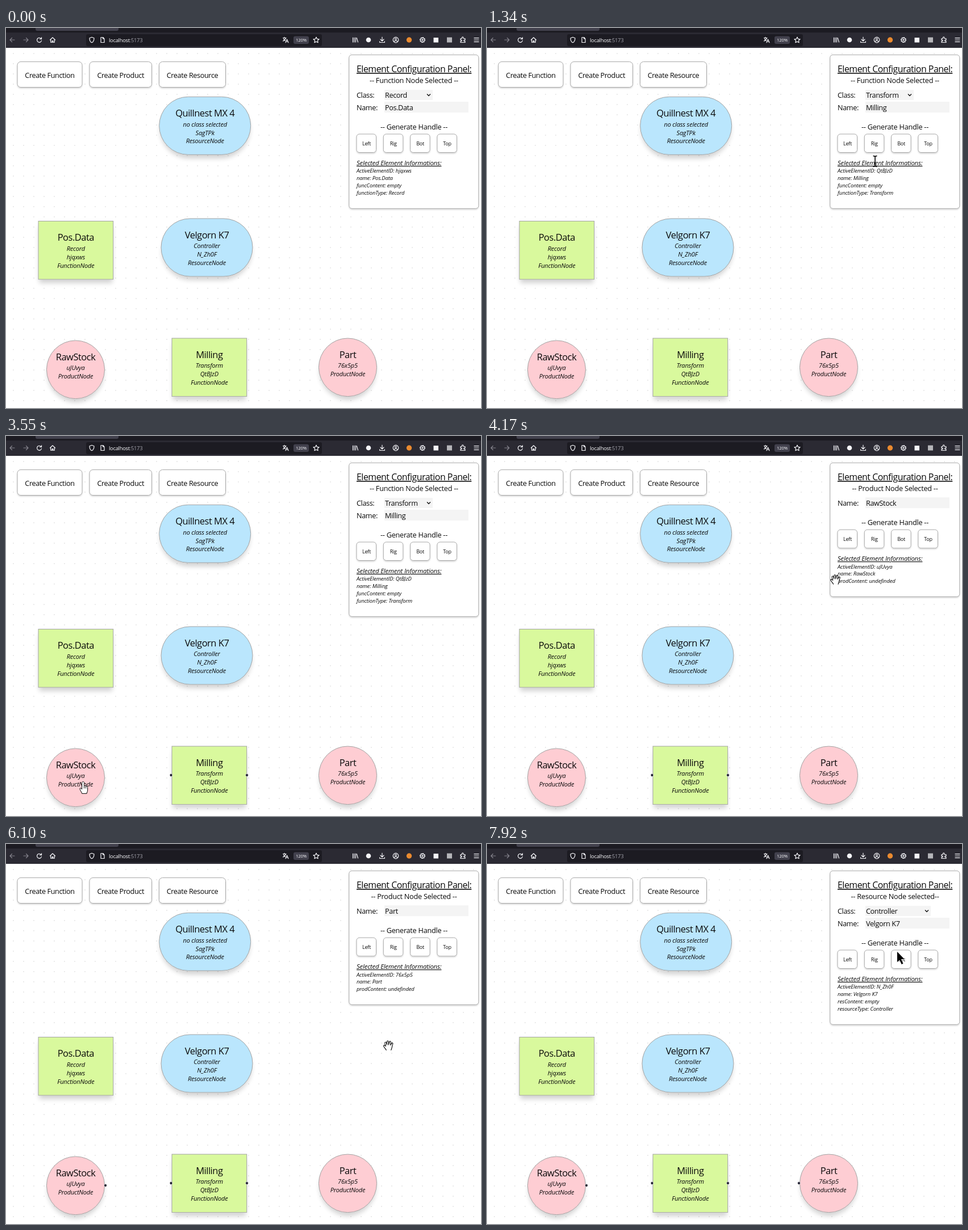
Write an HTML page that moves like this. It is 836 px wide and 670 px high and loops after 7.99 s.

```html
<!DOCTYPE html>
<html lang="en">
<head>
<meta charset="utf-8">
<title>Node editor</title>
<style>
  html, body { margin: 0; width: 100%; height: 100%; overflow: hidden; background: #fff; }
  svg { display: block; width: 100vw; height: 100vh; }
  text { font-family: "Open Sans", "Noto Sans", sans-serif; font-size: 12.65px; letter-spacing: -.03em; fill: #0a0a0a; }
  .mid { text-anchor: middle; }
  .title { font-size: 16.5px; }
  .sub { font-size: 11px; font-style: italic; letter-spacing: -.015em; }
  .head { font-size: 15.9px; text-decoration: underline; }
  .note { letter-spacing: -.018em; }
  .infoHead { font-size: 11.3px; font-style: italic; letter-spacing: -.012em; text-decoration: underline; }
  .info { font-size: 9.4px; font-style: italic; letter-spacing: -.01em; }
  .small { font-size: 9px; }
  .box { fill: #fff; stroke: #a9a9a9; }
  .node { stroke: #a3a3a3; }
  .field { fill: #f4f4f4; }
  .icon { fill: none; stroke: #f4f4f8; stroke-width: 1.2; stroke-linecap: round; stroke-linejoin: round; }
  .cursor path { stroke: #000; stroke-width: 1; fill: #fff; stroke-linejoin: round; }
</style>
</head>
<body>
<svg viewBox="0 0 836 670" xmlns="http://www.w3.org/2000/svg">
  <defs>
    <pattern id="grid" x="4" y="36" width="18" height="18" patternUnits="userSpaceOnUse">
      <circle cx="9" cy="9" r=".65" fill="#c4c4c4"/>
    </pattern>
    <filter id="nodeShadow" x="-20%" y="-20%" width="140%" height="150%">
      <feMorphology in="SourceAlpha" operator="erode" radius="2"/>
      <feGaussianBlur stdDeviation="4.5"/>
      <feOffset dy="7.5"/>
      <feComponentTransfer result="shadow"><feFuncA type="linear" slope=".18"/></feComponentTransfer>
      <feMerge><feMergeNode in="shadow"/><feMergeNode in="SourceGraphic"/></feMerge>
    </filter>
    <filter id="boxShadow" x="-20%" y="-20%" width="140%" height="150%">
      <feDropShadow dx="0" dy="1.6" stdDeviation="1.2" flood-opacity=".17"/>
    </filter>
  </defs>
  <rect width="836" height="670" fill="#fff"/>
  <rect y="35" width="836" height="635" fill="url(#grid)"/>
  <g id="nodes"></g>
  <g id="handles"></g>
  <g id="tools"></g>
  <g id="panel"></g>
  <g id="browser"></g>
  <g id="cursor" class="cursor"></g>
</svg>
<script>
const LOOP = 7990;
const $ = id => document.getElementById(id);

const text = (x, y, str, cls = '') => `<text x="${x}" y="${y}" class="${cls}">${str}</text>`;
const rect = (x, y, w, h, rx, attrs) => `<rect x="${x}" y="${y}" width="${w}" height="${h}" rx="${rx}" ${attrs}/>`;
const box = (x, y, w, h, rx) => rect(x, y, w, h, rx, 'class="box" filter="url(#boxShadow)"');

const SHAPES = {
  Resource: { w: 161, h: 102, rx: 51, fill: '#bae6fd' },
  Function: { w: 131.7, h: 102.6, rx: 0, fill: '#d9f99d' },
  Product: { w: 102, h: 102.6, rx: 51.3, fill: '#fecdd3' }
};

function node(kind, x, y, name, ...lines) {
  const { w, h, rx, fill } = SHAPES[kind];
  const cx = x + w / 2;
  return rect(x, y, w, h, rx, `class="node" fill="${fill}" filter="url(#nodeShadow)"`) +
    text(cx, y + 34.5, name, 'mid title') +
    [...lines, kind + 'Node'].map((s, i) => text(cx, y + 52.4 + i * 14.8, s, 'mid sub')).join('');
}

$('nodes').innerHTML =
  node('Resource', 269.7, 121.3, 'Quillnest MX 4', 'no class selected', 'SagTPk') +
  node('Resource', 273, 336, 'Velgorn K7', 'Controller', 'N_Zh0F') +
  node('Function', 57, 340.5, 'Pos.Data', 'Record', 'hjqxws') +
  node('Function', 292, 547, 'Milling', 'Transform', 'QtBJzD') +
  node('Product', 71.5, 551, 'RawStock', 'uJUvya') +
  node('Product', 550.5, 547, 'Part', '76x5p5');

$('tools').innerHTML = [['Function', 20, 114], ['Product', 147, 109.5], ['Resource', 269.5, 117]]
  .map(([s, x, w]) => box(x, 59.5, w, 45, 6) + text(x + w / 2, 88, 'Create ' + s, 'mid')).join('');

// Browser bar
const icon = (x, d, attrs = '') => `<path class="icon" transform="translate(${x} 21)" d="${d}" ${attrs}/>`;
const dim = 'style="stroke:#85848d"';
$('browser').innerHTML =
  rect(0, 0, 836, 9, 0, 'fill="#1c1b22"') +
  rect(0, 8, 836, 27, 0, 'fill="#2b2a33"') +
  rect(52, -5, 146, 10, 3, 'fill="#42414d"') +
  rect(141, 11, 415, 21, 3, 'fill="#1c1b22"') +
  rect(506, 14.5, 27, 13.5, 3, 'fill="#42414d"') +
  icon(11, 'M4 0H-4L-.5-3.5M-4 0-.5 3.5', dim) +
  icon(35, 'M-4 0H4L.5-3.5M4 0 .5 3.5', dim) +
  icon(58.5, 'M3.5-1.8A4 4 0 1 0 4 1M4-4.5V-1.5H1') +
  icon(82, 'M-4.5 0 0-4.2 4.5 0M-3.3-1V4.2H3.3V-1M-.8 4V1.5H.8V4') +
  icon(151, 'M0-4.8 4-3.3C4 1 3 3.5 0 4.8C-3 3.5-4 1-4-3.3Z') +
  icon(170, 'M-3-4.5H.8L3-2.2V4.5H-3ZM.5-4.5V-2H3') +
  `<text x="181" y="24.8" style="font-size:9.4px;fill:#fbfbfe">localhost<tspan fill="#a5a4ad">:5173</tspan></text>` +
  icon(492, 'M-4.5-3.5H1M-2-4.8V-3.5M.5-3.5C-.5-.5-2 1-4.5 2M-3.5-2C-2.5 0-1.5 1-.5 1.5M0 4.8 2.5-1 5 4.8M1 3H4') +
  `<text x="519.5" y="24.3" class="mid" style="font-size:7.8px;fill:#fbfbfe">120%</text>` +
  icon(546, 'M0-5 1.5-1.7 5-1.3 2.4 1.1 3.1 4.7 0 2.9-3.1 4.7-2.4 1.1-5-1.3-1.5-1.7Z') +
  icon(615, 'M-4.5-4V4M-2-4V4M.5-4V4M2.2-3.5 4.5 4') +
  '<circle cx="638" cy="21" r="4.3" fill="#f4f4f8"/>' +
  icon(662, 'M0-5V2M-3-1 0 2 3-1M-4.3 2.5V4.5H4.3V2.5') +
  icon(686, 'M4.8 0A4.8 4.8 0 1 1-4.8 0A4.8 4.8 0 1 1 4.8 0M-3 3C-2 .8 2 .8 3 3M1.5-1.5A1.5 1.5 0 1 1-1.5-1.5A1.5 1.5 0 1 1 1.5-1.5') +
  '<circle cx="709.5" cy="21" r="4.7" fill="#ea8a2f"/>' +
  icon(733, 'M3.6 0A3.6 3.6 0 1 1-3.6 0A3.6 3.6 0 1 1 3.6 0M1.2 0A1.2 1.2 0 1 1-1.2 0A1.2 1.2 0 1 1 1.2 0') +
  icon(733, 'M4.4 0A4.4 4.4 0 1 1-4.4 0A4.4 4.4 0 1 1 4.4 0', 'stroke-dasharray="1.2 2.25" stroke-linecap="butt"') +
  rect(752.5, 17, 8.5, 8.5, 0, 'fill="#f4f4f8"') +
  rect(776, 16.5, 9, 9, 0, 'fill="#b5b5b9"') +
  icon(804, 'M-4-2.5H-1.5C-2.5-6 2-6 1-2.5H4V.3C1-.5 1 3 4 2.3V4.5H-4V2.3C-1 3-1-.5-4 .3Z') +
  icon(828, 'M-4-3.3H4M-4 0H4M-4 3.3H4');

// Configuration panel
const SELECTIONS = [
  { at: 0, kind: 'Function', name: 'Pos.Data', type: 'Record', id: 'hjqxws' },
  { at: 800, kind: 'Function', name: 'Milling', type: 'Transform', id: 'QtBJzD' },
  { at: 3750, kind: 'Product', name: 'RawStock', id: 'uJUvya' },
  { at: 5700, kind: 'Product', name: 'Part', id: '76x5p5' },
  { at: 7500, kind: 'Resource', name: 'Velgorn K7', type: 'Controller', id: 'N_Zh0F' }
];

function drawPanel({ kind, name, type, id }) {
  const shift = type ? 0 : -21.8;
  const at = y => y + shift;
  const note = kind === 'Resource' ? '-- Resource Node selected--' : `-- ${kind} Node Selected --`;
  const prefix = { Function: 'func', Product: 'prod', Resource: 'res' }[kind];
  const info = ['ActiveElementID: ' + id, 'name: ' + name, `${prefix}Content: ${type ? 'empty' : 'undefinded'}`];
  let out = box(603.8, 47.3, 228, type ? 271 : 236, 5) +
    text(617, 78, 'Element Configuration Panel:', 'head') + text(718, 97, note, 'mid note');
  if (type) {
    const w = kind === 'Resource' ? 115 : 85;
    info.push(`${kind.toLowerCase()}Type: ${type}`);
    out += text(617, 122.7, 'Class:') + rect(666, 109, w, 18, 0, 'class="field"') + text(667, 122.7, type) +
      `<path d="M${663 + w - 7} 116.5l3 3 3-3" fill="none" stroke="#111" stroke-width="1.4"/>`;
  }
  out += text(617, at(144.6), 'Name:') + rect(666, at(130), 148, 19, 0, 'class="field"') + text(667, at(144.6), name) +
    text(718, at(179.2), '-- Generate Handle --', 'mid note');
  ['Left', 'Rig', 'Bot', 'Top'].forEach((s, i) => {
    const x = 617 + i * 47.3;
    out += box(x, at(187), 34.5, 32.5, 5) + text(x + 17.5, at(207), s, 'mid small');
  });
  out += text(617, at(242), 'Selected Element Informations:', 'infoHead');
  info.forEach((s, i) => { out += text(617, at(255.3 + i * 12.75), s, 'info'); });
  $('panel').innerHTML = out;
}

// Handles: appearance time, x, y
const HANDLES = [[2200, 290.5, 598], [2860, 424, 598], [5070, 175, 602], [6840, 549, 598]];
$('handles').innerHTML = HANDLES.map(([, x, y]) =>
  `<circle cx="${x}" cy="${y}" r="2.4" fill="#1a192b" stroke="#fff" stroke-width=".6"/>`).join('');
const handleDots = [...$('handles').children];

const CURSORS = {
  hand: '<path d="M-2 2C-2-.5 2-.5 2 2V8C2.5 6.5 5 7 5 8.8C5.5 7.5 8 8 8 10V15C8 18 6.5 19 6.5 21H-2C-2.5 18-6 15-5.5 12C-5 10.5-3.5 11.5-2 13.5ZM2 8V12M5 9V12"/>',
  grab: '<path transform="scale(1.08)" d="M-3 8C-4 5-7.5 3-7.5.5C-7-1-5-.5-4 1.5L-5.5-4C-5.5-6-3.5-6-3-4.5L-2-1-2-6.5C-2-8 .3-8 .5-6.5L.7-1 2-6C2.5-7.5 4.5-7 4.3-5.5L3.8-.5 5.5-3.5C6.5-5 8-4 7.5-2.5C6.5 0 6.5 4 4.5 8"/>',
  text: '<path style="fill:none;stroke-width:1.6" d="M-3.5-9.5Q0-9.5 0-7.5V7.5Q0 9.5-3.5 9.5M3.5-9.5Q0-9.5 0-7.5M0 7.5Q0 9.5 3.5 9.5"/>',
  arrow: '<path style="fill:#000;stroke:#fff;stroke-width:.8" d="M0 0V20L4.5 16 8 23.5 11.5 22 8 14.5H14Z"/>'
};

// Pointer route: time, x, y, cursor shape from then on
const ROUTE = [
  [180, 344, 662, 'grab'], [450, 346, 600, 'hand'], [800, 351, 599, 'hand'],
  [1070, 351, 599, 'grab'], [1340, 683, 235, 'text'], [1400, 683, 235, 'text'],
  [1500, 694, 211, 'hand'], [1860, 645, 209, 'hand'], [2130, 637, 196, 'hand'],
  [2330, 637, 194, 'hand'], [2600, 687, 202, 'hand'], [2860, 687, 202, 'hand'],
  [2930, 689, 203, 'hand'], [3070, 689, 203, 'grab'], [3450, 134, 608, 'hand'],
  [3820, 140, 613, 'hand'], [3890, 140, 613, 'grab'], [4170, 613, 253, 'grab'],
  [4230, 613, 253, 'grab'], [4450, 690, 190, 'hand'], [4720, 690, 188, 'hand'],
  [4860, 687, 182, 'hand'], [5070, 687, 182, 'grab'], [5330, 584, 568, 'hand'],
  [5400, 584, 568, 'hand'], [5500, 594, 606, 'hand'], [5820, 598, 593, 'hand'],
  [5890, 598, 593, 'grab'], [6150, 690, 300, 'arrow'], [6350, 640, 190, 'hand'],
  [6530, 636, 183, 'hand'], [6840, 636, 183, 'grab'], [7110, 463, 309, 'grab'],
  [7170, 463, 309, 'grab'], [7380, 357, 380, 'hand'], [7590, 369, 382, 'hand'],
  [7650, 369, 382, 'grab'], [7850, 650, 230, 'arrow'], [7920, 721.5, 189, 'arrow'],
  [LOOP, 721.5, 189, 'arrow']
];

let shownSelection, shownCursor;

function render(t) {
  const selection = SELECTIONS.filter(s => t >= s.at).pop();
  if (selection !== shownSelection) drawPanel(shownSelection = selection);
  handleDots.forEach((dot, i) => dot.setAttribute('visibility', t >= HANDLES[i][0] ? 'visible' : 'hidden'));

  const cursor = $('cursor');
  const next = ROUTE.findIndex(k => k[0] > t);
  cursor.setAttribute('visibility', next > 0 ? 'visible' : 'hidden');
  if (next < 1) return;
  const [t0, x0, y0, shape] = ROUTE[next - 1];
  const [t1, x1, y1] = ROUTE[next];
  const p = (t - t0) / (t1 - t0);
  if (shape !== shownCursor) cursor.innerHTML = CURSORS[shownCursor = shape];
  cursor.setAttribute('transform', `translate(${x0 + (x1 - x0) * p} ${y0 + (y1 - y0) * p})`);
}

const start = performance.now();
function tick() {
  render((performance.now() - start) % LOOP);
  requestAnimationFrame(tick);
}
tick();
</script>
</body>
</html>
```
